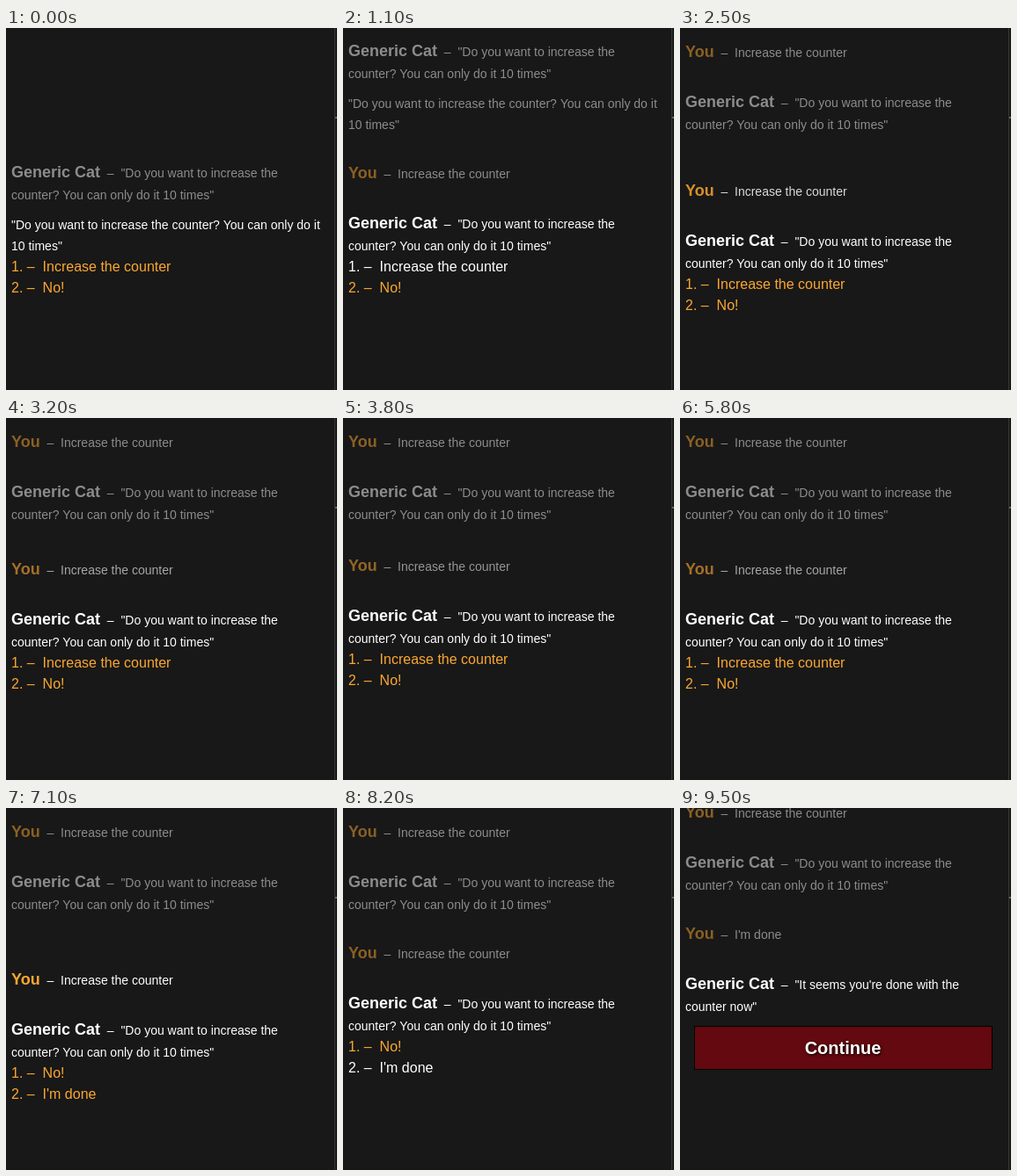
Recreate the animation shown at these times as an HTML page with a canvas. Size 376 by 412 pixels, loop 9700 ms.

```html
<!DOCTYPE html>
<html lang="en">
<head>
<meta charset="utf-8">
<title>Counter dialogue</title>
<style>
  html, body { margin: 0; width: 376px; height: 412px; overflow: hidden; background: #181818; }
  canvas { display: block; }
</style>
</head>
<body>
<canvas width="376" height="412"></canvas>
<script>
const ctx = document.querySelector('canvas').getContext('2d');
const LOOP = 9700, STEP = 100, SLIDE = 310, RISE = 30, CHUNK = 138;
const ORANGE = '#fba730', WHITE = '#fff', DIM = 0.5;
const FAMILY = '"Liberation Sans", Arial, sans-serif';
const GAP = '\u00a0\u00a0', DASH = GAP + '–' + GAP;

// Each click: time, and how far its slide has already run when it is first seen
const clicks = [
  [800, 35], [1700, 0], [2500, 66], [3100, 45], [3600, 0], [4400, 66],
  [5000, 0], [5700, 45], [6400, 20], [7100, 0], [9200, 0]
];
const INCREASE = 'Increase the counter';
const question = ['"Do you want to increase the', 'counter? You can only do it 10 times"'];
const farewell = ['"It seems you\'re done with the', 'counter now"'];

// CSS "ease": cubic-bezier(.25, .1, .25, 1)
function ease(x) {
  if (x >= 1) return 1;
  const bez = (a, b, s) => 3 * a * s * (1 - s) ** 2 + 3 * b * s * s * (1 - s) + s ** 3;
  let lo = 0, hi = 1;
  for (let i = 0; i < 20; i++) {
    const mid = (lo + hi) / 2;
    if (bez(0.25, 0.25, mid) < x) lo = mid; else hi = mid;
  }
  return bez(0.1, 1, lo);
}

function text(str, x, y, size, color, weight = '') {
  ctx.font = `${weight} ${size}px ${FAMILY}`;
  ctx.fillStyle = color;
  ctx.fillText(str, x, y);
  return x + ctx.measureText(str).width;
}

function speech(name, line, y, color, alpha) {
  ctx.globalAlpha = alpha;
  const x = text(name, 6, y, 18, color, 'bold');
  text(DASH + line, x, y, 14, WHITE);
  ctx.globalAlpha = 1;
}

function cat([first, second], y, alpha) {
  speech('Generic Cat', first, y, WHITE, alpha);
  ctx.globalAlpha = alpha;
  text(second, 6, y + 25, 14, WHITE);
  ctx.globalAlpha = 1;
}

function intro(y, alpha) {
  cat(question, y + 169.5, DIM);
  ctx.globalAlpha = alpha;
  text('"Do you want to increase the counter? You can only do it', 6, y + 229, 14, WHITE);
  text('10 times"', 6, y + 253, 14, WHITE);
  ctx.globalAlpha = 1;
}

function exchange(answer, reply, y, youAlpha, catAlpha) {
  speech('You', answer, y + 171, ORANGE, youAlpha);
  cat(reply, y + 228, catAlpha);
}

function options(list, hovered, y) {
  list.forEach((label, i) =>
    text(`${i + 1}. –${GAP}${label}`, 6, y + 277 + 24 * i, 16, i === hovered ? WHITE : ORANGE));
}

function button(y) {
  ctx.fillStyle = '#000';
  ctx.fillRect(16, y, 339, 50);
  ctx.fillStyle = '#64090f';
  ctx.fillRect(17, y + 1, 337, 48);
  ctx.textAlign = 'center';
  ctx.shadowColor = '#000';
  ctx.shadowBlur = 3;
  ctx.shadowOffsetX = ctx.shadowOffsetY = 1;
  text('Continue', 185, y + 32, 20, WHITE, 'bold');
  ctx.shadowColor = 'transparent';
  ctx.textAlign = 'left';
}

function hoveredOption(t, count, settled) {
  if (count === 0) return t >= 300 ? 0 : -1;
  if (t >= 8200) return 1;
  return settled && t < 8000 ? 0 : -1;
}

function draw(t) {
  ctx.fillStyle = '#181818';
  ctx.fillRect(0, 0, 376, 412);
  ctx.fillStyle = '#3b3733';
  ctx.fillRect(373, 0, 1, 412);
  ctx.fillStyle = '#666';
  ctx.fillRect(374, 101, 2, 2);

  const count = clicks.filter(([at]) => t >= at).length;
  const done = count === clicks.length;
  const scroll = done ? -22 : 0;
  const [at, lead] = clicks[count - 1] || [0, SLIDE];
  const elapsed = t - at + lead;
  const progress = ease(elapsed / SLIDE);
  const y = scroll + RISE * (1 - progress);

  if (count === 0) intro(0, 1);
  else {
    if (count === 1) intro(-CHUNK, DIM);
    else exchange(INCREASE, question, scroll - CHUNK, DIM, DIM);
    exchange(done ? "I'm done" : INCREASE, done ? farewell : question, y, 1 - (1 - DIM) * progress, 1);
  }
  if (done) button(y + 270);
  else options(count < 10 ? [INCREASE, 'No!'] : ['No!', "I'm done"],
    hoveredOption(t, count, elapsed >= SLIDE), y);
}

const start = performance.now();
function tick() {
  const t = (performance.now() - start) % LOOP;
  draw(Math.floor(t / STEP) * STEP);
  requestAnimationFrame(tick);
}
tick();
</script>
</body>
</html>
```
